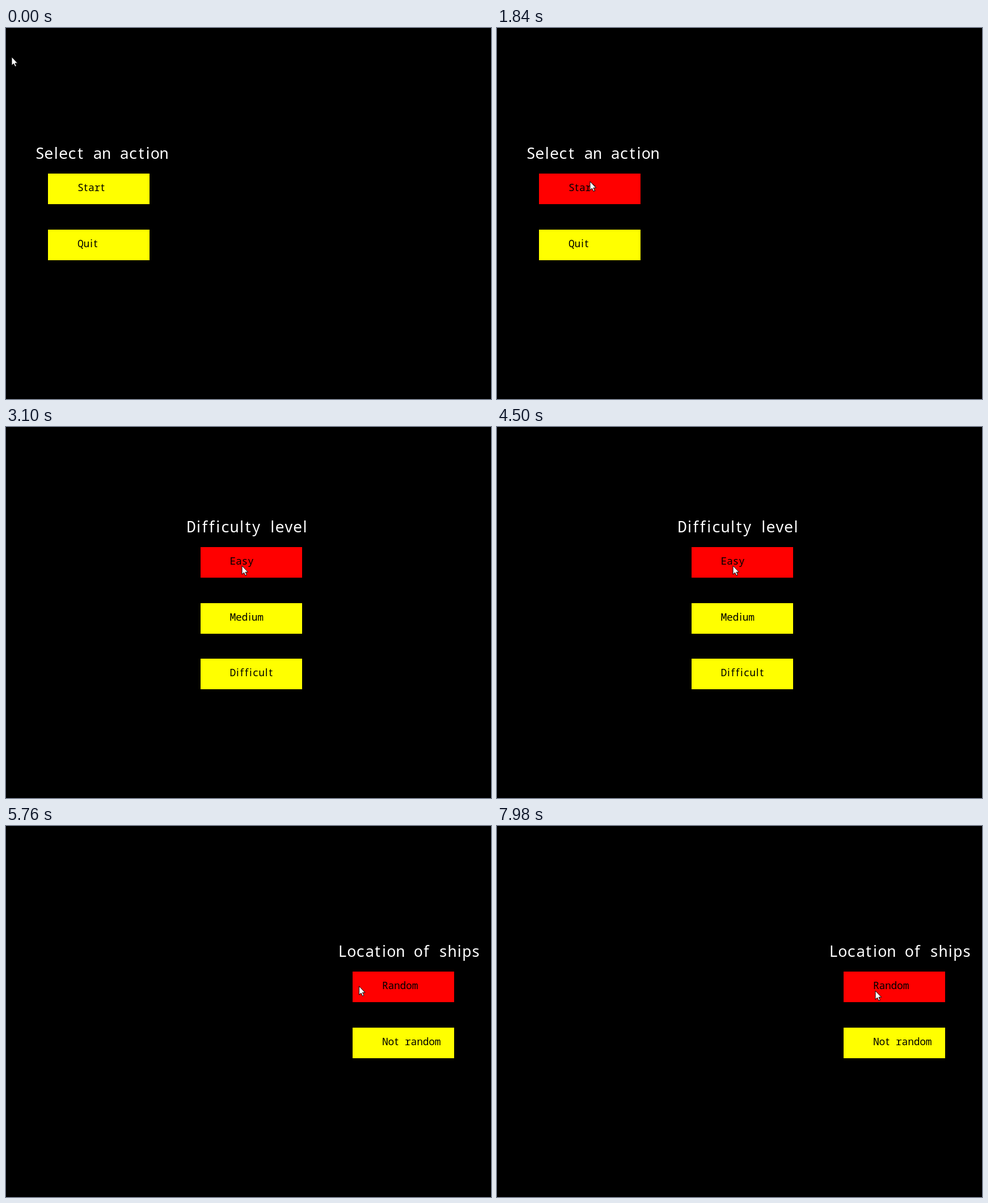
These frames come from a looping animation (855x655 px, 8 s). An HTML page:

```html
<!DOCTYPE html>
<html lang="en">
<head>
<meta charset="utf-8">
<title>Game menu</title>
<style>
html, body { margin: 0; width: 100%; height: 100%; overflow: hidden; background: #000; }
body { font-family: "Noto Sans Mono", monospace; }
.menu:not(.open) { display: none; }
.title, .button, svg { position: absolute; white-space: pre; }
.title { font-size: 27px; line-height: 30px; letter-spacing: -.015em; color: #fff; }
.button { width: 179px; height: 54px; box-sizing: border-box; padding-left: 52px;
  font-size: 18px; line-height: 48px; letter-spacing: -.015em; color: #000; background: #ff0; }
.button.hover { background: #f00; }
/* narrow letters take less room than the fixed cell */
i { position: relative; left: .06em; font: normal 1em "Noto Sans", sans-serif;
  line-height: inherit; letter-spacing: .11em; }
svg { left: 0; top: 0; overflow: visible; }
</style>
</head>
<body>
<svg id="cursor" width="12" height="19">
  <path d="M0 0V15.2L3.5 12 6 17.3 8.4 16.2 6 11.2H10.6Z" fill="#fff" stroke="#000"/>
</svg>
<script>
const LOOP = 8000;
const BUTTON = { width: 179, height: 54, step: 98.5 };

const menus = [
  { start: 0, title: 'Select an action', labels: ['Start', 'Quit'] },
  { start: 2120, title: 'Difficulty level', labels: ['Easy', 'Medium', 'Difficult'] },
  { start: 4800, title: 'Location of ships', labels: ['Random', 'Not random'] },
];

// the pointer rests between moves; sag bows the path downwards
const home = { x: 10, y: 51 };
const moves = [
  { start: 0, end: 1000, x: 164, y: 271, sag: 0 },
  { start: 2260, end: 2960, x: 416, y: 245, sag: 13 },
  { start: 5000, end: 6040, x: 667, y: 291, sag: 0 },
];

const cursor = document.getElementById('cursor');

function addText(parent, className, text, x, y) {
  const el = document.createElement('div');
  el.className = className;
  el.innerHTML = text.replace(/[filt]+/g, '<i>$&</i>');
  el.style.left = x + 'px';
  el.style.top = y + 'px';
  parent.append(el);
  return el;
}

menus.forEach((menu, column) => {
  const top = 212 + (3 - menu.labels.length) * 45;
  menu.x = 74 + column * 268.5;
  menu.el = document.createElement('div');
  document.body.insertBefore(menu.el, cursor);
  addText(menu.el, 'title', menu.title, 51.5 + column * 267, top - 51.5);
  menu.buttons = menu.labels.map((label, row) => {
    const y = top + row * BUTTON.step;
    return { y, el: addText(menu.el, 'button', label, menu.x, y) };
  });
});

const smooth = k => k * k * (3 - 2 * k);

function pointerAt(t) {
  let { x, y } = home;
  for (const move of moves) {
    if (t < move.start) break;
    const k = smooth(Math.min(1, (t - move.start) / (move.end - move.start)));
    x += (move.x - x) * k;
    y += (move.y - y) * k + move.sag * Math.sin(Math.PI * k);
  }
  return { x, y };
}

function draw(t) {
  const { x, y } = pointerAt(t);
  cursor.style.transform = `translate(${x}px, ${y}px)`;
  const current = menus.findLast(menu => menu.start <= t);
  for (const menu of menus) {
    menu.el.className = menu === current ? 'menu open' : 'menu';
    for (const button of menu.buttons) {
      const inside = x >= menu.x && x < menu.x + BUTTON.width
        && y >= button.y && y < button.y + BUTTON.height;
      button.el.classList.toggle('hover', inside);
    }
  }
}

const begin = performance.now();
function tick() {
  draw((performance.now() - begin) % LOOP);
  requestAnimationFrame(tick);
}
tick();
</script>
</body>
</html>
```
